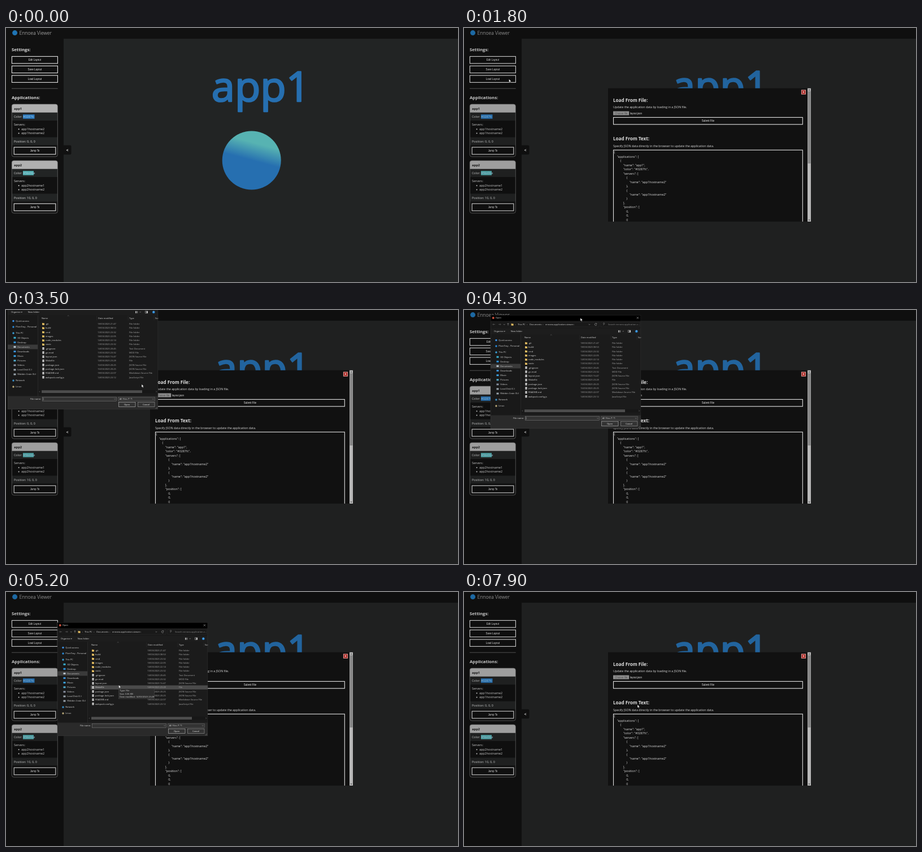
An HTML page for the animation above (8000 ms loop, 800 by 450 pixels).

```html
<!DOCTYPE html>
<html lang="en">
<head>
<meta charset="utf-8">
<title>Layout viewer</title>
<style>
html, body { margin: 0; width: 100%; height: 100%; overflow: hidden; background: #111; }
svg { display: block; width: 100vw; height: 100vh; }
text { font-family: "Open Sans", "Noto Sans", sans-serif; white-space: pre; }
.ui { font-family: "Liberation Sans", Arial, sans-serif; }
</style>
</head>
<body>
<svg id="stage" viewBox="0 0 800 450"></svg>
<script>
const LOOP = 8000, STEP = 100;
const ROW_TOP = 103.6, ROW_GAP = 7.27;

const rect = (x, y, w, h, fill, extra = '') =>
  `<rect x="${x}" y="${y}" width="${w}" height="${h}" fill="${fill}" ${extra}/>`;
const frame = (x, y, w, h, stroke, width, fill = 'none') =>
  rect(x, y, w, h, fill, `stroke="${stroke}" stroke-width="${width}"`);
const circle = (x, y, r, fill) => `<circle cx="${x}" cy="${y}" r="${r}" fill="${fill}"/>`;
const line = (d, stroke, width = 0.5) =>
  `<path d="${d}" fill="none" stroke="${stroke}" stroke-width="${width}"/>`;
// y is the middle of the capitals
const text = (x, y, str, size, fill, extra = '') =>
  `<text x="${x}" y="${(y + size * 0.36).toFixed(2)}" font-size="${size}" fill="${fill}" ${extra}>${str}</text>`;
const bold = 'font-weight="700"', middle = 'text-anchor="middle"';
const button = (x, y, w, h, label) => frame(x, y, w, h, '#e2e2e2', 1.1, '#111') +
  text(x + w / 2, y + h / 2, label, 4.45, '#eee', `class="ui" ${middle}`);

function card(y, name, color, hex, servers, position) {
  const at = dy => y + dy;
  return rect(10.3, at(0), 81, 93, '#111', 'rx="3.5"') +
    `<path d="M10.3 ${at(14.7)}v-11.2q0 -3.5 3.5 -3.5h74q3.5 0 3.5 3.5v11.2z" fill="#b0b0b0"/>` +
    text(14, at(7.7), name, 5.8, '#161616', bold) +
    rect(10.6, at(15), 80.4, 14, '#222424') +
    text(14, at(22), 'Color:', 5.33, '#ddd') +
    rect(30, at(18.2), hex.width, 7.6, color) +
    text(30.3, at(22), hex.label, 5.2, '#a5cbe0') +
    text(14, at(36.3), 'Servers:', 5.33, '#ddd') +
    servers.map((s, i) => circle(22.6, at(44.2 + i * 7.3), 1, '#ddd') +
      text(27, at(44 + i * 7.3), s, 5.4, '#ddd')).join('') +
    rect(10.6, at(58.5), 80.4, 14, '#222424') +
    text(14, at(65.7), 'Position: ' + position, 5.4, '#ddd') +
    button(14.2, at(76.2), 73.6, 12.6, 'Jump To') +
    rect(10.3, at(0), 81, 93, 'none', 'rx="3.5" stroke="#777" stroke-width=".7"');
}

const scene = () => rect(0, 0, 800, 450, '#222424') +
  `<g id="word"><text x="363.8" y="129.5" font-size="74" fill="#266fb0" stroke="#266fb0"
    stroke-width="2.6" stroke-linejoin="round">app1</text></g>` +
  circle(434.7, 234.5, 52, 'url(#ball)') +
  rect(0, 0, 800, 19, '#111') + rect(0, 0, 102, 450, '#111') +
  circle(15.6, 8.6, 4.5, '#1f74b4') +
  text(23.7, 9.3, 'Ennoea Viewer', 8.6, '#e4e4e4', 'font-weight="300"') +
  text(10, 38.5, 'Settings:', 7.75, '#ddd', bold) +
  ['Edit Layout', 'Save Layout', 'Load Layout']
    .map((label, i) => button(10.4, 50.4 + i * 16.8, 81, 12.4, label)).join('') +
  rect(10, 106.8, 81.7, 0.7, '#777') +
  text(10, 123, 'Applications:', 7.75, '#ddd', bold) +
  card(135, 'app1', '#2a78bd', { label: '#0287fc', width: 20.5 },
    ['app1hostname2', 'app1hostname2'], '0, 0, 0') +
  card(235, 'app2', '#53aeb0', { label: '#5bc0be', width: 19 },
    ['app2hostname1', 'app2hostname2'], '10, 0, 0') +
  '<path d="M102 207.7h11q2.5 0 2.5 2.5v11.600q0 2.500 -2.500 2.500h-11z" fill="#111"/>' +
  text(108.6, 216, '&lt;', 7, '#eee', bold + ' ' + middle);

const json = [
  [0, '{'], [1, '"applications": ['], [2, '{'], [3, '"name": "app1",'],
  [3, '"color": "#0287fc",'], [3, '"servers": ['], [4, '{'],
  [5, '"name": "app1hostname2"'], [4, '},'], [4, '{'],
  [5, '"name": "app1hostname2"'], [4, '}'], [3, '],'], [3, '"position": ['],
  [4, '0,'], [4, '0,'], [4, '0']
];

const modal = () => '<g id="modal" clip-path="url(#modalBox)">' +
  rect(255, 106.500, 359, 236.5, '#111') +
  rect(608, 106.500, 6, 236.5, '#b8b8b8') + rect(608.5, 112, 5, 128, '#868686') +
  '<path d="M609.500 110.500l1.500 -2l1.500 2zM609.500 339.500l1.500 2l1.500 -2z" fill="#444"/>' +
  frame(597.4, 110, 7.200, 7.200, '#e6a09c', 1, '#a82622') +
  text(601, 113.600, 'x', 5, '#fff', `class="ui" ${bold} ${middle}`) +
  text(264, 128, 'Load From File:', 8.1, '#ddd', bold) +
  text(264, 140.5, 'Update the application data by loading in a JSON file.', 5.33, '#ddd') +
  rect(264, 147.5, 28.200, 7, '#8e8e8e') +
  text(278.1, 151, 'Choose file', 4.45, '#4c4c4c', `class="ui" ${middle}`) +
  text(293.8, 151, 'layout.json', 4.45, '#e4e4e4', 'class="ui"') +
  button(264.5, 158.4, 334.8, 12.4, 'Submit File') +
  text(264, 196, 'Load From Text:', 8.1, '#ddd', bold) +
  text(264, 208.7, 'Specify JSON data directly in the browser to update the application data.', 5.33, '#ddd') +
  frame(264.5, 216.2, 334.8, 160, '#e2e2e2', 1.1) +
  json.map(([depth, str], i) =>
    text(265.2 + depth * 5.5, 220.4 + i * 7.47, str, 5.33, '#ddd')).join('') +
  '</g>';

const files = [
  ['.git', '18/03/2023 21:47', 'File folder'],
  ['build', '18/03/2023 08:53', 'File folder'],
  ['cmd', '13/03/2023 23:32', 'File folder'],
  ['images', '18/03/2023 22:05', 'File folder'],
  ['node_modules', '14/03/2023 22:14', 'File folder'],
  ['static', '13/03/2023 23:32', 'File folder'],
  ['.gitignore', '14/03/2023 20:45', 'Text Document'],
  ['go.mod', '13/03/2023 23:32', 'MOD File'],
  ['layout.json', '18/03/2023 16:47', 'JSON Source File'],
  ['Makefile', '14/03/2023 23:28', 'File'],
  ['package.json', '16/03/2023 20:25', 'JSON Source File'],
  ['package-lock.json', '16/03/2023 20:25', 'JSON Source File'],
  ['README.md', '18/03/2023 22:07', 'Markdown Source File'],
  ['webpack.config.js', '14/03/2023 23:12', 'JavaScript File']
];

// label, middle y, indent, icon colour
const places = [
  ['Quick access', 98.5, 0, '#3c8ee0'], ['PlomTray - Personal', 109, 0, '#2a8ad8'],
  ['This PC', 120, 0, '#3aa0d8'], ['3D Objects', 128.2, 3, '#38b0d0'],
  ['Desktop', 136.3, 3, '#2c8fd8'], ['Documents', 144.4, 3, '#b8c4cc'],
  ['Downloads', 152.5, 3, '#3a90d8'], ['Music', 160.6, 3, '#3aa0e0'],
  ['Pictures', 168.7, 3, '#50a8c8'], ['Videos', 176.8, 3, '#8890a0'],
  ['Local Disk (C:)', 184.9, 3, '#9aa4ac'], ['Wobbin Crate (G:)', 193, 3, '#9aa4ac'],
  ['Network', 204, 0, '#3a90c8'], ['Linux', 215, 0, '#b8a878']
];

const icon = (x, y, isFolder) => isFolder
  ? rect(x, y - 1.700, 1.8, 1, '#c99b3c') + rect(x, y - 1.200, 4, 3.2, '#e3bd62')
  : rect(x + 0.4, y - 2.200, 3.200, 4.4, '#d8d8d8') + rect(x + 1, y - 0.600, 2, 0.5, '#888') +
    rect(x + 1, y + 0.600, 2, 0.5, '#888');

const small = (x, y, str, fill = '#d6d6d6', extra = '') => text(x, y, str, 4, fill, extra);

function fileRow([name, date, type], i) {
  const y = ROW_TOP + i * ROW_GAP;
  return icon(152, y, type === 'File folder') + small(158, y, name) +
    small(250.3, y, date, '#aaa') + small(306, y, type, '#aaa');
}

const placeRow = ([label, y, indent, color]) =>
  (indent ? rect(101.500, y - 1.5, 4, 3, color) : circle(101, y, 1.7, color)) +
  small(105.2 + indent, y, label);

const dialog = () => '<g id="dialog"><g clip-path="url(#dialogBox)">' +
  rect(91, 54, 266, 201, '#1b1b1b') +
  rect(91, 54, 266, 10.5, '#000') + circle(95.8, 59, 2, '#c8503c') +
  small(99.8, 59, 'Open', '#ddd') + line('M349.7 57.2l3.4 3.4m0 -3.4l-3.4 3.4', '#ddd') +
  rect(91, 64.5, 266, 13, '#191919') +
  line('M99 70.500h-4m1.500 -1.500l-1.500 1.500l1.500 1.500M105 70.500h4m-1.500 -1.500l1.500 1.500l-1.500 1.500', '#777') +
  line('M114 70l1.300 1.300l1.300 -1.300M122 72.500v-4m-1.500 1.500l1.500 -1.500l1.500 1.500', '#bbb') +
  frame(126, 66.2, 157, 8.800, '#333', 0.4) + icon(127.6, 70.6, true) +
  small(134.5, 70.6, '›') + small(139, 70.6, 'This PC') + small(155.3, 70.6, '›') +
  small(160, 70.6, 'Documents') + small(183.3, 70.6, '›') +
  small(188, 70.6, 'ennoea-application-viewer') + small(238, 70.6, '›') +
  line('M264.700 70l1.300 1.300l1.300 -1.300M278.700 69.400a1.900 1.900 0 1 0 .3 1.600m0 -2.700v1.400h-1.400', '#bbb') +
  frame(286, 66.2, 69, 8.800, '#333', 0.4) +
  line('M292.500 69.700a1.200 1.200 0 1 0 -.1 .1l-2 2.200', '#999') +
  small(299, 70.6, 'Search ennoea-application-v...', '#888') +
  rect(91, 77.500, 266, 11, '#1d1d1d') +
  small(97, 82.8, 'Organise') + '<path d="M114.600 82.200h2.400l-1.200 1.500z" fill="#ccc"/>' +
  small(126.8, 82.8, 'New folder') +
  rect(317, 80.9, 1.6, 3.800, '#bbb') + rect(319.4, 80.9, 1.8, 3.800, '#777') +
  line('M324.500 82l1.200 1.200l1.200 -1.200', '#bbb') +
  frame(334.4, 81, 4.4, 3.600, '#ccc', 0.5) + rect(336.6, 81, 2.200, 3.600, '#ccc') +
  circle(349.3, 82.8, 2.300, '#2a8ad8') + text(349.3, 82.8, '?', 3.4, '#fff', middle) +
  rect(91, 88.5, 53, 143.5, '#191919') + rect(91, 140.4, 53, 8, '#3a3a3a') +
  rect(144, 88.500, 0.6, 143.5, '#333') +
  places.map(placeRow).join('') +
  line('M196.800 89.800l1.400 -1.200l1.400 1.200', '#999', 0.4) +
  small(151, 93.3, 'Name') + small(251, 93.3, 'Date modified') +
  small(306, 93.3, 'Type') + small(351.7, 93.3, 'Size') +
  line('M248.700 89.500v8M304.200 89.500v8M350 89.500v8', '#3a3a3a', 0.4) +
  `<rect id="hover" x="149.7" width="208" height="7.2"/>` +
  files.map(fileRow).join('') +
  rect(145, 220.8, 212, 5.600, '#171717') + rect(151, 221.2, 178, 4.8, '#4d4d4d') +
  line('M148.300 222.400l-1.200 1.200l1.200 1.200M353.500 222.400l1.200 1.200l-1.200 1.200', '#999') +
  rect(91, 231.5, 266, 23.5, '#2a2a2a') +
  small(150, 236.6, 'File name:', '#ddd', 'text-anchor="end"') +
  frame(152.3, 233.2, 131.2, 7, '#888', 0.5, '#333') +
  line('M279.500 236.200l1.200 1.200l1.200 -1.200', '#aaa') +
  small(154, 236.7, '', '#eee', 'id="fileName"') +
  `<rect id="caret" y="234.4" width=".4" height="4.6" fill="#eee"/>` +
  frame(286.8, 233.2, 64.4, 7, '#777', 0.5, '#333') + small(288.8, 236.7, 'All Files (*.*)') +
  line('M347 236.200l1.200 1.200l1.200 -1.200', '#aaa') +
  `<rect id="open" x="287.3" y="242.6" width="29.7" height="8" stroke="#bbb" stroke-width=".6"/>` +
  small(302.1, 246.6, 'Open', '#eee', middle) +
  frame(321.3, 242.6, 29.7, 8, '#999', 0.6, '#333') + small(336.1, 246.6, 'Cancel', '#eee', middle) +
  line('M352.500 254.200l3.600 -3.600m-1.800 3.600l1.800 -1.800', '#888') +
  rect(91, 54, 266, 201, 'none', 'stroke="#3c3c3c" stroke-width=".6"') + '</g>' +
  '<g id="tip">' + frame(199.3, 171.3, 63.4, 17.700, '#555', 0.4, '#2b2b2b') +
  ['Type: File', 'Size: 3.36 KB', 'Date modified: 14/03/2023 23:28']
    .map((str, i) => small(201.3, 174.6 + i * 5.700, str)).join('') + '</g></g>';

const stage = document.getElementById('stage');
stage.innerHTML = `<defs>
  <linearGradient id="ball" gradientUnits="userSpaceOnUse" x1="438" y1="203" x2="430" y2="233">
    <stop offset="0" stop-color="#57b3b2"/><stop offset="1" stop-color="#266fb0"/>
  </linearGradient>
  <clipPath id="modalBox">${rect(255, 106.500, 359, 236.5, '#000')}</clipPath>
  <clipPath id="dialogBox">${rect(90.7, 53.7, 266.6, 201.6, '#000')}</clipPath>
  </defs>` + scene() + rect(0, 0, 800, 450, '#000', 'id="dim" opacity=".1"') + modal() + dialog() +
  `<path id="cursor" d="M0 0v5.600l1.300 -1.200l.9 2.100l1 -.4l-.9 -2.100h1.800z"
    fill="#fff" stroke="#000" stroke-width=".4"/>`;

const el = id => document.getElementById(id);
const show = (id, on) => el(id).setAttribute('visibility', on ? 'visible' : 'hidden');
const set = (id, name, value) => el(id).setAttribute(name, value);
const move = (id, [x, y]) => set(id, 'transform', `translate(${x} ${y})`);
const smooth = u => u * u * (3 - 2 * u);

// keys are [time, x, y]
function along(keys, t, ease = smooth) {
  const next = keys.findIndex(k => k[0] > t);
  if (next < 0) return keys[keys.length - 1].slice(1);
  if (next === 0) return keys[0].slice(1);
  const a = keys[next - 1], b = keys[next];
  const u = ease((t - a[0]) / (b[0] - a[0]));
  return [a[1] + (b[1] - a[1]) * u, a[2] + (b[2] - a[2]) * u];
}

const drag = [[3800, -88, -79], [4300, -44, -45], [4700, 0, 0]];
const pointer = [
  [100, 240, 299], [1200, 79.5, 90.5], [1900, 79.5, 90.5], [2700, 278.6, 150.5],
  [2800, 279, 150.7], [3000, 279, 150.7], [3400, 240, 131.5], [3500, 240, 131.5],
  [3800, 162, -20], [4700, 250, 59], [4800, 250, 59], [5100, 199.5, 164.8],
  [6200, 199.5, 164.8], [6500, 187.500, 160.2], [6800, 187.500, 160.2],
  [7100, 305, 240.5], [7300, 305, 240.5], [7800, 307, 199.5]
];

function draw(time) {
  const t = Math.floor(time / STEP) * STEP;
  const opened = t >= 1400, browsing = t >= 3000 && t < 7300;
  const picked = t >= 6800;
  ['dim', 'modal'].forEach(id => show(id, opened));

  const turn = Math.min(t / 1400, 1);
  const sx = 1 - 0.026 * turn;
  set('word', 'transform', `matrix(${sx} 0 0 1 ${524 * (1 - sx) + turn} 0)`);
  set('ball', 'gradientTransform', `rotate(${12 * turn} 434.7 234.5)`);

  el('dialog').style.display = browsing ? '' : 'none';
  const shift = along(drag, t, u => u);
  move('dialog', shift);

  const [x, y] = t >= 3800 && t < 4700
    ? [shift[0] + 250, shift[1] + 59] : along(pointer, t);
  move('cursor', [x, y]);
  show('cursor', t >= 100);

  const row = Math.round((y - ROW_TOP) / ROW_GAP + 0.35);
  const over = t >= 4800 && x > 150 && row >= 0 && row < files.length;
  const active = picked ? 8 : row;
  set('hover', 'y', ROW_TOP + active * ROW_GAP - 3.6);
  set('hover', 'fill', picked ? '#626262' : '#4b4b4b');
  el('hover').style.display = picked || over ? '' : 'none';
  el('tip').style.display = t >= 5200 && t < 5800 ? '' : 'none';

  el('fileName').textContent = picked ? 'layout.json' : '';
  set('caret', 'x', 153.8);
  show('caret', browsing && !picked && Math.floor(t / 530) % 2 === 0);
  set('open', 'fill', t >= 7200 ? '#555' : '#333');
}

function tick(now) {
  draw(now % LOOP);
  requestAnimationFrame(tick);
}
draw(0);
requestAnimationFrame(tick);
</script>
</body>
</html>
```
